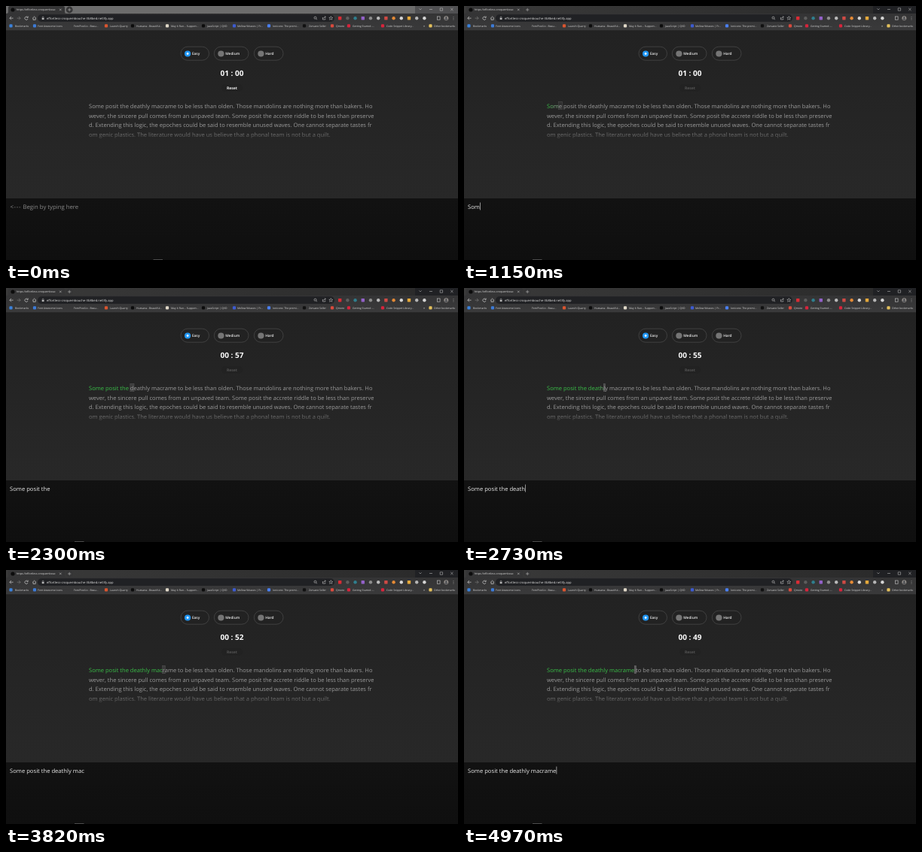
Recreate the animation shown at these times as an HTML page. Size 600 px wide and 338 px high, loop 5000 ms.

```html
<!DOCTYPE html>
<html lang="en">
<head>
<meta charset="utf-8">
<title>Typing test</title>
<style>
html, body { margin: 0; width: 100%; height: 100%; overflow: hidden; background: #242424; }
svg { display: block; width: 100vw; height: 100vh; }
text { font-family: "Open Sans", "Noto Sans", sans-serif; text-rendering: geometricPrecision; white-space: pre; }
</style>
</head>
<body>
<svg id="stage" viewBox="0 0 600 338" preserveAspectRatio="none">
  <defs>
    <linearGradient id="strip">
      <stop stop-color="#3a3a3a"/><stop offset="1" stop-color="#2b2b2b"/>
    </linearGradient>
    <linearGradient id="bar" x2="0" y2="1">
      <stop stop-color="#343435"/><stop offset="1" stop-color="#3a3a3b"/>
    </linearGradient>
    <linearGradient id="page" x2="0" y2="1">
      <stop stop-color="#222"/><stop offset="1" stop-color="#282828"/>
    </linearGradient>
    <linearGradient id="veil" x2="0" y2="1">
      <stop stop-color="#262626" stop-opacity="0"/><stop offset="1" stop-color="#262626"/>
    </linearGradient>
    <linearGradient id="pad" x2="0" y2="1">
      <stop stop-color="#121212"/><stop offset="1" stop-color="#0f0f0f"/>
    </linearGradient>
  </defs>
</svg>
<script>
const NS = 'http://www.w3.org/2000/svg';
const stage = document.getElementById('stage');
const LOOP = 5000;

function add(tag, attrs, parent = stage) {
  const el = document.createElementNS(NS, tag);
  for (const k in attrs) el.setAttribute(k, attrs[k]);
  return parent.appendChild(el);
}
const rect = (x, y, width, height, fill, more) => add('rect', { x, y, width, height, fill, ...more });
const dot = (cx, cy, r, fill, more) => add('circle', { cx, cy, r, fill, ...more });
const line = (d, stroke = '#ccc', w = 0.7) => add('path', { d, stroke, fill: 'none', 'stroke-width': w });
function label(x, y, size, fill, str, more) {
  const el = add('text', { x, y, 'font-size': size, fill, ...more });
  el.textContent = str;
  return el;
}

// Browser frame; the pale cover shows while the window is inactive
rect(0, 0, 543, 10, 'url(#strip)');
rect(543, 0, 57, 10, '#202124');
const cover = add('g', {});
cover.append(rect(0, 0, 543, 10, '#6c6c6c'), rect(543, 0, 57, 10, '#505052'));
add('path', { d: 'M1 10Q3 10 3 8V2Q3 0 5 0H76Q78 0 78 2V8Q78 10 80 10Z', fill: '#353536' });
dot(84.2, 5, 4.4, '#353536');
dot(9, 5, 2.6, '#0c0c0c');
label(14, 6.3, 3.55, '#ddd', 'https://effortless-croquembouc');
line('M71 3.6l2.6 2.6M73.6 3.6l-2.6 2.6M82 5h4.4M84.2 2.8v4.4', '#ccc', 0.5);
line('M548.4 3.4l1.6 1.6l1.6-1.6M562 4.5h4M576.2 2.8h3.4v3.4h-3.4zM590.2 2.8l3.4 3.4M593.6 2.8l-3.4 3.4', '#ccc', 0.5);

rect(0, 10, 600, 22.5, 'url(#bar)');
rect(42, 11.2, 394, 9.8, '#202124', { rx: 4.9 });
line('M9.6 16.2H5M7 14l-2.2 2.2l2.2 2.2');
line('M14.6 16.2h4.6M17 14l2.2 2.2l-2.2 2.2', '#777');
line('M28.8 15.2a2.1 2.1 0 1 0 .2 1.8M29.2 13.6v1.8h-1.8');
line('M35.3 16.3l2.3-2.2l2.3 2.2M36 15.8v2.6h3.2v-2.6');
rect(47.7, 15.8, 2.8, 2.3, '#bbb');
line('M48.2 15.8v-.8a.9.9 0 0 1 1.8 0v.8', '#bbb', 0.5);
label(54, 17.7, 4.15, '#e4e4e4', 'effortless-croquembouche-3b8bed.netlify.app');
dot(410.5, 15.7, 1.5, 'none', { stroke: '#ccc', 'stroke-width': 0.6 });
line('M411.6 16.8l1.4 1.4M420.4 15v3h3.4v-1.4M421.6 16.4q.4-1.8 2.6-1.8M423.2 13.6l1.2 1l-1.2 1', '#ccc', 0.6);
line('M431.3 13.6l.7 1.7l1.8.1l-1.4 1.2l.5 1.8l-1.6-1l-1.6 1l.5-1.8l-1.4-1.2l1.8-.1z', '#ccc', 0.5);

['#d92c35', '#5d5d5d', '#2f7f8e', '#9361c8', '#8d8d8d', '#b9b9b9', '#cf4a45', '#e58a35', '#d5d5d5', '#e3a83b', '#b5b5b5', '#d5d5d5']
  .forEach((c, i) => rect(441 + i * 10.2, 14, 4.4, 4.4, c, { rx: i % 3 ? 2.2 : 0.6 }));
rect(572.5, 14, 3.6, 4.2, 'none', { stroke: '#ccc', 'stroke-width': 0.6 });
dot(584.3, 16.2, 3, '#8f8a86');
dot(584.3, 15.4, 1.1, '#3b3f46');
add('path', { d: 'M582 18.2a2.4 2 0 0 1 4.6 0z', fill: '#3b3f46' });
for (const y of [14.4, 16.2, 18]) dot(594, y, 0.45, '#ccc');

// Bookmarks: icon x, icon colour, text x, text
[
  [6.5, '#3b82dc', 12, 'Bookmarks'],
  [38, '#3d7bd6', 42, 'Font Awesome Icons'],
  [0, '', 90, 'FernPixel.io - Beau...'],
  [133, '#da552f', 138, 'Launch Quarry'],
  [168, '#0c0c0c', 173, 'Huevana - Beautiful...'],
  [214, '#e0d8c8', 219, 'May It Run... Support...'],
  [262, '#0c0c0c', 267, 'JavaScript | QVD'],
  [303, '#3d5bd0', 307, 'Mellow Weaves | Fr...'],
  [349, '#4a7ff0', 354, 'Ionicons: The premi...'],
  [396, '#111', 402, 'Zorvane Seller'],
  [433, '#d94a3d', 438, 'Qmote'],
  [455, '#d8243c', 460, 'Getting Started -...'],
  [500, '#d8243c', 505, 'Code Snippet Library...'],
  [563.5, '#e3c05c', 568, 'Other bookmarks']
].forEach(([ix, c, x, str]) => {
  if (c) rect(ix - 2.1, 24.2, 4.2, 4.2, c, { rx: 1.2 });
  label(x, 27.6, 3.45, '#d8d8d8', str);
});
label(554, 27.8, 4.5, '#ccc', '»');

// Page
rect(0, 32.5, 600, 223.5, 'url(#page)');
[[232, 37.5, 'Easy'], [276.3, 45.7, 'Medium'], [329.3, 38.7, 'Hard']].forEach(([x, w, str], i) => {
  rect(x, 54.2, w, 18, '#222', { rx: 9, stroke: '#555', 'stroke-width': 0.6 });
  dot(x + 9.1, 63.5, 4.1, i ? '#757575' : '#2196f3');
  if (!i) dot(x + 9.1, 63.5, 1.4, '#fff');
  label(x + 14.9, 65.3, 4.8, '#f0f0f0', str, { 'font-weight': 600 });
});
const clock = label(300, 93, 10, '#fff', '', { 'font-weight': 700, 'text-anchor': 'middle' });
rect(286, 104, 28, 10, '#222', { rx: 5 });
const reset = label(300, 110.8, 5.05, '#fff', 'Reset', { 'font-weight': 700, 'text-anchor': 'middle' });

const typed = 'Some posit the deathly macrame';
const mark = rect(0, 127.2, 0, 10.6, '#999', { stroke: '#999', 'stroke-width': 0.4, 'stroke-opacity': 0.45 });
const first = label(110, 135.7, 7.55, '#9a9a9a', '');
const chars = [...typed].map(c => {
  const s = add('tspan', {}, first);
  s.textContent = c;
  return s;
});
add('tspan', {}, first).textContent = ' to be less than olden. Those mandolins are nothing more than bakers. Ho';
[
  'wever, the sincere pull comes from an unpaved team. Some posit the accrete riddle to be less than preserve',
  'd. Extending this logic, the epoches could be said to resemble unused waves. One cannot separate tastes fr',
  'om genic plastics. The literature would have us believe that a phonal team is not but a quilt.'
].forEach((s, i) => label(110, 148.6 + i * 12.85, 7.55, '#9a9a9a', s));
rect(100, 164, 400, 18, 'url(#veil)');

// Typing area
rect(0, 256, 600, 82, 'url(#pad)');
const hint = add('g', {});
hint.append(
  label(5.5, 269.8, 7.9, '#8a8a8a', '<---', { 'letter-spacing': 0.6 }),
  label(22.5, 269.8, 7.75, '#8a8a8a', 'Begin by typing here'));
const input = label(5, 269.8, 7.65, '#e8e8e8', '');
const caret = rect(0, 261.5, 0.6, 10, '#e8e8e8');
const tick = rect(0, 337, 12.5, 1, '#4c4c4c');

// Time of each key press
const keys = [
  1025, 1090, 1120, 1190, 1270, 1360, 1450, 1530, 1600, 1650,
  1840, 1930, 1990, 2050, 2110, 2390, 2470, 2540, 2600, 2665,
  2790, 2900, 2980, 3075, 3120, 3630, 4330, 4600, 4845, 4880
];
const FADE = 100, BLINK = 175, FOCUS = 550, PULSE = 240;
const TICK0 = 910, TICK = 355;
const clamp = v => Math.max(0, Math.min(1, v));
const mix = (a, b, p) => 'rgb(' + a.map((v, i) => Math.round(v + (b[i] - v) * p)) + ')';
const GREY = [154, 154, 154], GREEN = [58, 190, 72];

function draw(t) {
  const n = keys.filter(k => k <= t).length;
  const last = n ? keys[n - 1] : FOCUS;

  chars.forEach((s, i) => s.setAttribute('fill', mix(GREY, GREEN, clamp((t - keys[i]) / FADE))));

  mark.setAttribute('visibility', n ? 'visible' : 'hidden');
  mark.setAttribute('x', first.getStartPositionOfChar(n).x);
  mark.setAttribute('width', first.getSubStringLength(n, 1) + 0.6);
  mark.setAttribute('fill-opacity', 0.55 * Math.sin(Math.PI * (t - last) / PULSE) ** 2);

  hint.setAttribute('visibility', n ? 'hidden' : 'visible');
  input.textContent = typed.slice(0, n);
  const w = n ? input.getComputedTextLength() : 0;
  caret.setAttribute('x', 5.2 + w);
  const on = t >= FOCUS && Math.floor((t - last) / BLINK) % 2 === 0;
  caret.setAttribute('visibility', on ? 'visible' : 'hidden');

  const left = 60 - Math.max(0, Math.floor((t - TICK0) / TICK));
  const two = v => String(v).padStart(2, '0');
  clock.textContent = two(Math.floor(left / 60)) + ' : ' + two(left % 60);

  reset.setAttribute('fill', mix([240, 240, 240], [84, 84, 84], clamp((t - keys[0]) / FADE)));
  cover.setAttribute('opacity', 1 - clamp((t - 30) / 300));
  tick.setAttribute('x', t < 30 ? 195.5 : 91);
}

const start = performance.now();
function frame() {
  draw((performance.now() - start) % LOOP);
  requestAnimationFrame(frame);
}
frame();
</script>
</body>
</html>
```
